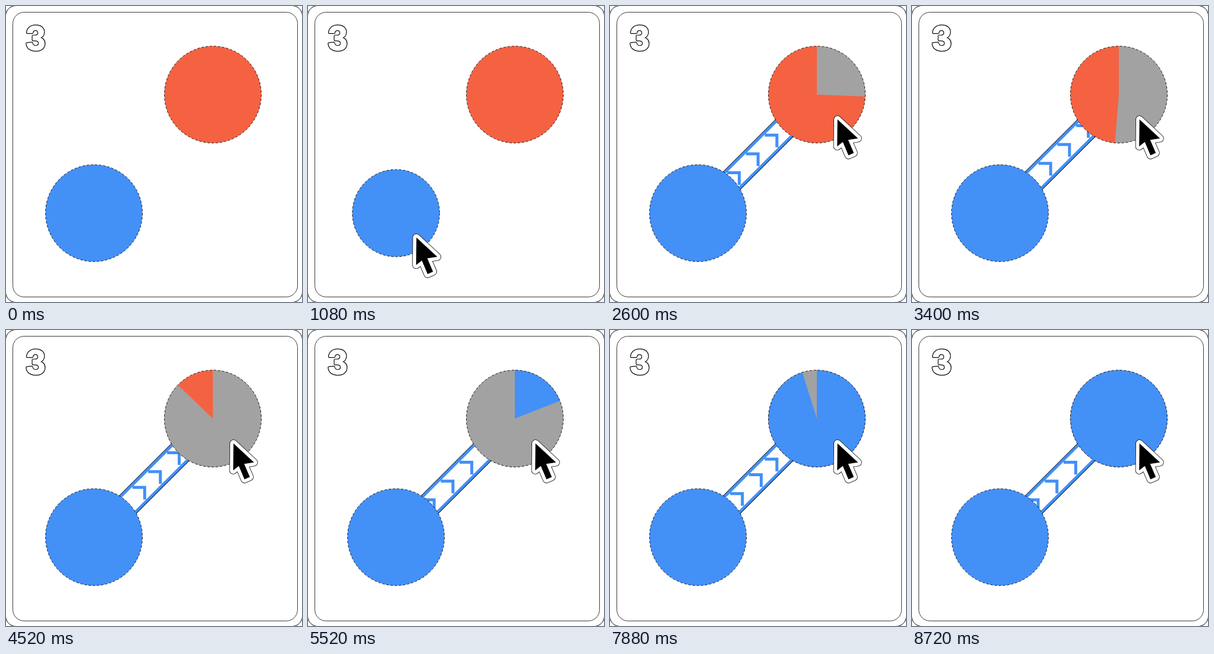
These frames come from a looping animation (498 px wide and 498 px high, 8.76 s). An HTML page with a canvas:

```html
<!DOCTYPE html>
<html>
<head>
<meta charset="utf-8">
<style>
html, body { margin: 0; width: 100%; height: 100%; overflow: hidden; background: #fff; }
canvas { display: block; width: 498px; height: 498px; }
</style>
</head>
<body>
<canvas id="stage" width="498" height="498"></canvas>
<script>
const ctx = document.getElementById('stage').getContext('2d');
const LOOP = 8760, STEP = 40, RADIUS = 81.5;
const BLUE = '#4390f7', RED = '#f46242', GREY = '#a2a2a2', INK = '#080808';
const source = { x: 148, y: 348.5 }, goal = { x: 348, y: 149 };
const BLUE_PRESS = 1000, RED_PRESS = 1800;

const clamp = v => Math.max(0, Math.min(1, v));
const smooth = v => v * v * (3 - 2 * v);
const mix = (a, b, v) => a + (b - a) * v;

// Eased interpolation through [time, value] keys.
function track(t, keys) {
  if (t <= keys[0][0]) return keys[0][1];
  for (let i = 1; i < keys.length; i++) {
    const [t0, a] = keys[i - 1], [t1, b] = keys[i];
    if (t < t1) return mix(a, b, smooth((t - t0) / (t1 - t0)));
  }
  return keys[keys.length - 1][1];
}

const pressScale = (t, start) => track(t - start, [
  [0, 1], [80, 0.9], [170, 1.045], [290, 1]
]);

function disc(center, radius, color) {
  ctx.beginPath();
  ctx.arc(center.x, center.y, radius, 0, 2 * Math.PI);
  ctx.fillStyle = color;
  ctx.fill();
}

function rim(center, radius) {
  ctx.beginPath();
  ctx.arc(center.x, center.y, radius, 0, 2 * Math.PI);
  ctx.setLineDash([4, 3]);
  ctx.lineWidth = 0.9;
  ctx.strokeStyle = INK;
  ctx.stroke();
  ctx.setLineDash([]);
}

function sector(center, radius, portion, color) {
  if (portion <= 0) return;
  const top = -Math.PI / 2;
  ctx.beginPath();
  ctx.moveTo(center.x, center.y);
  ctx.arc(center.x, center.y, radius, top, top + portion * 2 * Math.PI);
  ctx.closePath();
  ctx.fillStyle = color;
  ctx.fill();
}

function drawCard() {
  ctx.fillStyle = '#fff';
  ctx.fillRect(0, 0, 498, 498);
  ctx.strokeStyle = INK;
  ctx.lineWidth = 1;
  ctx.beginPath();
  ctx.roundRect(-0.5, -0.5, 499, 499, 17);
  ctx.stroke();
  ctx.lineWidth = 0.8;
  ctx.beginPath();
  ctx.roundRect(11.5, 10.5, 479, 479, 19);
  ctx.stroke();

  ctx.font = 'bold 58px "Liberation Sans", Arial, sans-serif';
  ctx.lineJoin = 'round';
  for (const [width, color] of [[4.4, INK], [2, '#fff']]) {
    ctx.lineWidth = width;
    ctx.strokeStyle = color;
    ctx.strokeText('3', 34, 74.3);
  }
  ctx.fillStyle = '#fff';
  ctx.fillText('3', 34, 74.3);
}

function rail(offset) {
  const length = Math.hypot(goal.x - source.x, goal.y - source.y);
  ctx.fillStyle = BLUE;
  ctx.fillRect(0, offset - 2.5, length, 5);
  ctx.fillStyle = INK;
  ctx.fillRect(0, offset + Math.sign(offset) * 2.5 - 0.4, length, 0.8);
}

function chevron(x) {
  const y = 498 - x;
  ctx.beginPath();
  ctx.moveTo(x - 23, y + 2.5);
  ctx.lineTo(x - 2.5, y + 2.5);
  ctx.lineTo(x - 2.5, y + 23);
  ctx.stroke();
}

function drawTube(t) {
  ctx.save();
  ctx.translate(source.x, source.y);
  ctx.rotate(Math.atan2(goal.y - source.y, goal.x - source.x));
  rail(-16.8);
  rail(19.6);
  ctx.restore();

  // Each chevron walks its own stretch in six steps, slightly out of sync.
  const stride = 5.28, steps = 6;
  const phase = 1.05 * (t - 1880) / STEP + steps;
  ctx.strokeStyle = BLUE;
  ctx.lineWidth = 5;
  ctx.lineJoin = 'miter';
  [1.05, 1.03, 0.6, 0.47].forEach((lead, i) => {
    const step = Math.floor(phase + lead) % steps;
    chevron(183 + (i * steps + step) * stride);
  });
}

const ARROW = [[-18, -30], [-18.5, 15.5], [-9, 8], [0.5, 30.5], [9.5, 26.5], [0, 4.5], [16.5, 2]];

function drawCursor(t) {
  if (t < 240) return;
  const enter = smooth(clamp((t - 240) / 740));
  const travel = smooth(clamp((t - 1140) / 620));
  const x = mix(mix(540, 200.7, enter), 400.7, travel);
  const y = mix(mix(550, 420, enter), 220.8, travel);
  const scale = track(t, [
    [940, 1.38], [1100, 1], [1260, 1.38], [1740, 1.38], [1940, 1]
  ]);

  ctx.save();
  ctx.translate(x, y);
  ctx.scale(scale, scale);
  ctx.beginPath();
  ARROW.forEach(([px, py]) => ctx.lineTo(px, py));
  ctx.closePath();
  ctx.lineJoin = 'round';
  for (const [width, color] of [[13, INK], [11.4, '#fff']]) {
    ctx.lineWidth = width;
    ctx.strokeStyle = color;
    ctx.stroke();
  }
  ctx.fillStyle = '#000';
  ctx.fill();
  ctx.restore();
}

function draw(t) {
  drawCard();
  if (t >= RED_PRESS) drawTube(t);

  const blueRadius = RADIUS * pressScale(t, BLUE_PRESS);
  disc(source, blueRadius, BLUE);
  rim(source, blueRadius);

  const redRadius = RADIUS * pressScale(t, RED_PRESS);
  disc(goal, redRadius, RED);
  sector(goal, redRadius, clamp((t - 1800) / 3120), GREY);
  sector(goal, redRadius, clamp((t - 4930) / 3100), BLUE);
  rim(goal, redRadius);

  drawCursor(t);
}

const began = performance.now();
function tick() {
  const t = (performance.now() - began) % LOOP;
  draw(Math.floor(t / STEP) * STEP);
  requestAnimationFrame(tick);
}
tick();
</script>
</body>
</html>
```
